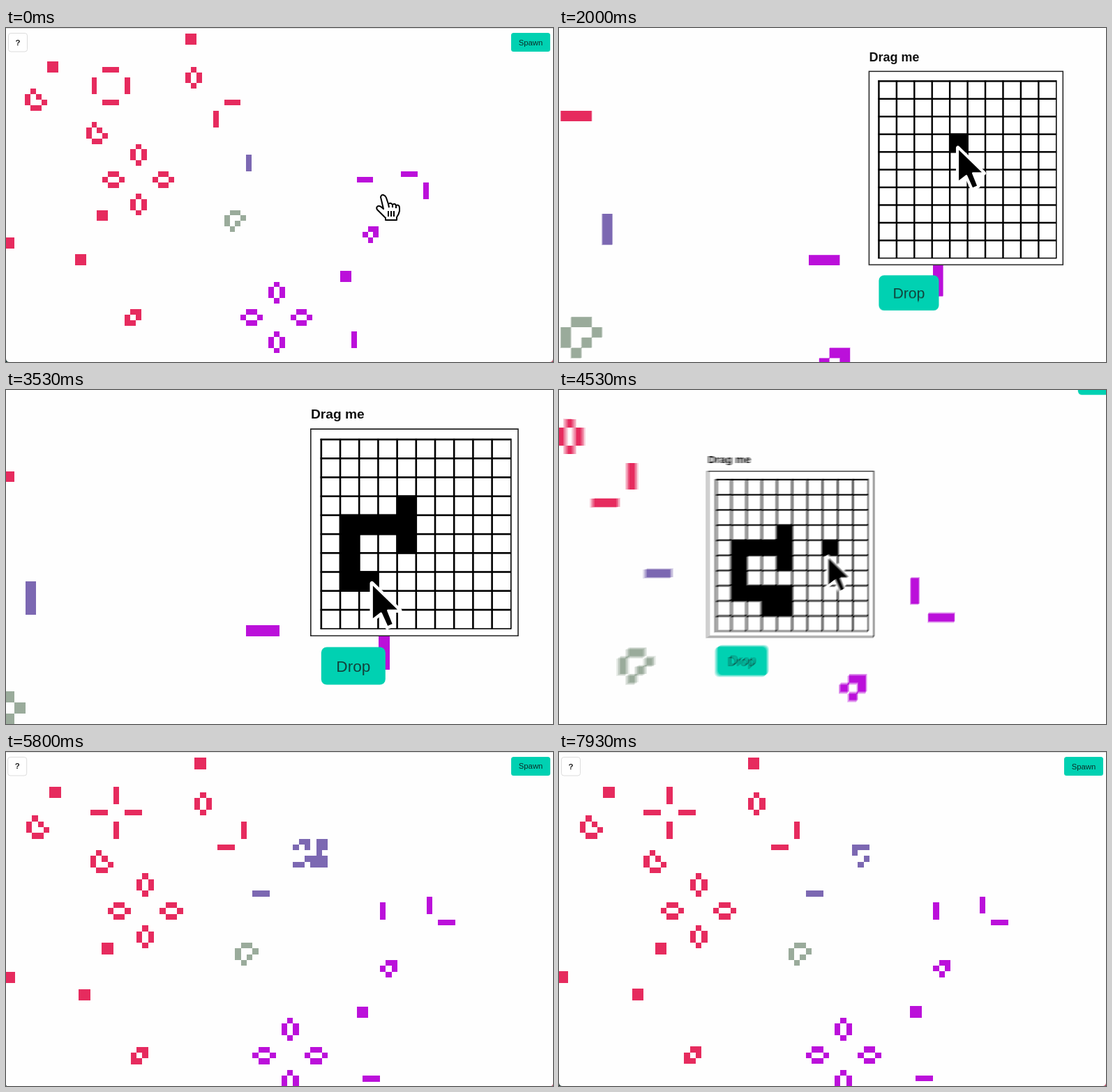
An HTML page with a canvas for the animation above (8 s loop, 784 px wide and 480 px high).

```html
<!DOCTYPE html>
<html lang="en">
<head>
<meta charset="utf-8">
<title>Life board</title>
<style>
  html, body { margin: 0; width: 100%; height: 100%; overflow: hidden; background: #fefefe; }
  canvas { display: block; }
</style>
</head>
<body>
<canvas id="stage" width="784" height="480"></canvas>
<script>
const W = 784, H = 480, LOOP = 8000;
const stage = document.getElementById('stage').getContext('2d');
const scene = document.createElement('canvas');
scene.width = W;
scene.height = H;
const ctx = scene.getContext('2d');
const RED = '#e62b5e', PURPLE = '#bb10da', BLUE = '#7c68b2', SAGE = '#9aab9b', TEAL = '#00d1b2';
const FONT = '"Liberation Sans", Arial, sans-serif';

// ---- Game of Life -------------------------------------------------------
const STEP = 342, PHASE = 0.4, FADING_GEN = 4, DROP_GEN = 15;
const DROP_TIME = (DROP_GEN - PHASE) * STEP;

const SHAPES = {
  block: ['XX', 'XX'],
  hiveV: ['.X', 'X.X', 'X.X', '.X'],
  hiveH: ['.XX', 'X..X', '.XX'],
  loaf: ['.X', 'X.X', 'X..X', '.XX'],
  loafUp: ['.XX', 'X..X', 'X.X', '.X'],
  ship: ['.XX', 'X.X', 'XX'],
  boat: ['.XX', 'X.X', '.X'],
  barH: ['XXX'],
  barV: ['X', 'X', 'X'],
  hats: ['.X', 'X.X', '', '', '', 'X.X', '.X']
};

function put(board, color, shape, ...places) {
  for (const [col, row] of places)
    SHAPES[shape].forEach((line, y) => [...line].forEach((ch, x) => {
      if (ch === 'X') board.set(`${col + x},${row + y}`, color);
    }));
}

function putFarm(board, color, col, row) {
  put(board, color, 'hiveV', [col, row], [col, row + 9]);
  put(board, color, 'hiveH', [col - 5, row + 5], [col + 4, row + 5]);
}

function nextBoard(board) {
  const near = new Map();
  for (const [key, color] of board) {
    const [col, row] = key.split(',').map(Number);
    for (let dy = -1; dy <= 1; dy++)
      for (let dx = -1; dx <= 1; dx++) {
        if (!dx && !dy) continue;
        const k = `${col + dx},${row + dy}`;
        near.set(k, { n: (near.get(k)?.n || 0) + 1, color });
      }
  }
  const next = new Map();
  for (const [k, { n, color }] of near)
    if (n === 3 || (n === 2 && board.has(k))) next.set(k, board.get(k) || color);
  return next;
}

// Cells painted in the panel: time, column, row.
const PAINT = [
  [1950, 4, 3], [2150, 4, 4], [2300, 4, 5], [2520, 3, 4], [2680, 2, 4],
  [2840, 1, 4], [3000, 1, 5], [3150, 1, 6], [3330, 1, 7], [3480, 2, 7],
  [3650, 3, 7], [3740, 4, 7], [3840, 4, 8], [3940, 3, 8], [4150, 7, 4]
];

function buildBoards() {
  let board = new Map();
  put(board, RED, 'block', [33, 1], [8, 6], [17, 33], [0, 38], [13, 41]);
  put(board, RED, 'hiveV', [33, 7]);
  put(board, RED, 'loaf', [4, 11], [15, 17]);
  put(board, RED, 'ship', [22, 51]);
  put(board, RED, 'barH', [18, 7], [18, 13], [40, 13]);
  put(board, RED, 'barV', [16, 9], [22, 9], [38, 15]);
  putFarm(board, RED, 23, 21);
  put(board, BLUE, 'barV', [44, 23]);
  put(board, SAGE, 'loafUp', [40, 33]);
  put(board, PURPLE, 'barH', [64, 27], [72, 26]);
  put(board, PURPLE, 'barV', [76, 28], [63, 55]);
  put(board, PURPLE, 'boat', [65, 36]);
  put(board, PURPLE, 'block', [61, 44]);
  putFarm(board, PURPLE, 48, 46);

  const boards = [board];
  for (let gen = 1; gen < 25; gen++) {
    board = nextBoard(board);
    if (gen === FADING_GEN) put(board, BLUE, 'hats', [52, 11]);
    if (gen === DROP_GEN)
      for (const [, col, row] of PAINT) board.set(`${50 + col},${12 + row}`, BLUE);
    boards.push(board);
  }
  return boards;
}
const boards = buildBoards();

// ---- Motion -------------------------------------------------------------
const PANEL_OPEN = 1580;
const HOME = [548.6, 72.6];
const cellCentre = ([t, col, row]) => [t, HOME[0] + 14 + col * 13.6, HOME[1] + 16 + row * 13.6];

const cursorKeys = [
  [1130, 540, 240], [1330, 697, 147], [1480, 752, 24], [1600, 752, 24],
  ...PAINT.slice(0, -1).map(cellCentre),
  [4140, 657, 150], [4480, 500, 179], [4560, 500, 179],
  [4850, 424, 276], [5020, 424, 276], [5450, 520, 340]
];
const panelKeys = [[4140, ...HOME], [4480, 392.3, 102.3]];
const focusKeys = [[2000, 669, 85], [3530, 661, 89.7], [4530, 691, 79]];

function track(keys, t) {
  const i = keys.findIndex(k => k[0] > t);
  if (i === 0) return keys[0].slice(1);
  if (i < 0) return keys[keys.length - 1].slice(1);
  const [a, b] = [keys[i - 1], keys[i]];
  const p = (t - a[0]) / (b[0] - a[0]), e = p * p * (3 - 2 * p);
  return [a[1] + (b[1] - a[1]) * e, a[2] + (b[2] - a[2]) * e];
}

// Critically damped spring from 0 to 1.
function spring(ms) {
  const s = Math.max(0, ms) * 0.006;
  return 1 - (1 + s) * Math.exp(-s);
}

function cameraAt(t) {
  const extra = spring(t - 1408) - spring(t - 4302);
  const [fx, fy] = track(focusKeys, t);
  return { z: 1 + extra, x: -fx * extra, y: -fy * extra };
}

// ---- Drawing ------------------------------------------------------------
function drawBoard(t, cam) {
  const [size, x0, y0] = t < DROP_TIME ? [7.92, -4.2, 0.2] : [8.3, -3.2, 0];
  const sx = col => Math.round((x0 + col * size) * cam.z + cam.x);
  const sy = row => Math.round((y0 + row * size) * cam.z + cam.y);
  for (const [key, color] of boards[Math.floor(t / STEP + PHASE)]) {
    const [col, row] = key.split(',').map(Number);
    ctx.fillStyle = color;
    ctx.fillRect(sx(col), sy(row), sx(col + 1) - sx(col), sy(row + 1) - sy(row));
  }
}

function box(x, y, w, h, r, fill, stroke) {
  ctx.beginPath();
  ctx.roundRect(x, y, w, h, r);
  ctx.fillStyle = fill;
  ctx.fill();
  if (stroke) {
    ctx.strokeStyle = stroke;
    ctx.lineWidth = 0.8;
    ctx.stroke();
  }
}

function text(str, x, y, size, color, weight = 'normal', align = 'center') {
  ctx.font = `${weight} ${size}px ${FONT}`;
  ctx.textAlign = align;
  ctx.fillStyle = color;
  ctx.fillText(str, x, y);
}

function drawFrame() {
  ctx.fillStyle = '#d6d6d6';
  ctx.fillRect(0, 0, W, 0.8);
  const corner = (x, inner, color) => {
    ctx.beginPath();
    ctx.moveTo(x, H);
    ctx.lineTo(inner, H);
    ctx.quadraticCurveTo(x, H, x, H - 5);
    ctx.fillStyle = color;
    ctx.fill();
  };
  corner(0, 5, '#17332d');
  corner(W, W - 5, '#b5506a');
}

function drawButtons() {
  box(3.5, 7.5, 27, 26.5, 3.5, '#fff', '#d4d4d4');
  text('?', 17, 24.5, 11.5, '#222', 'bold');
  box(724, 7, 56, 27, 3.5, TEAL);
  text('Spawn', 752, 24.5, 11.3, '#0b2f2a');
}

function drawPanel(t) {
  const cell = 13.6;
  ctx.save();
  ctx.translate(...track(panelKeys, t));
  text('Drag me', 0.4, -7.2, 9.6, '#111', 'bold', 'left');
  box(0.3, 0.3, 148.6, 148.6, 0, '#fff', '#222');
  ctx.translate(7.8, 7.8);
  ctx.fillStyle = '#000';
  for (let i = 0; i <= 10; i++) {
    const line = i === 10 ? 0.8 : 1.3;
    ctx.fillRect(i * cell - line / 2, -0.6, line, 136.8);
    ctx.fillRect(-0.6, i * cell - line / 2, 136.8, line);
  }
  for (const [when, col, row] of PAINT)
    if (t >= when) ctx.fillRect(col * cell - 0.6, row * cell - 0.6, cell + 1.2, cell + 1.2);
  box(0, 149.2, 46, 27, 4, TEAL);
  text('Drop', 23, 166.8, 11.3, '#12433c');
  ctx.restore();
}

const arrow = new Path2D('M0 0V26.5L6.5 21.5L11 31.5L15.5 29.5L11.5 19.5H20Z');
const hand = new Path2D('M-3 3Q-2-1 1 0Q4 1 5 4L8 13Q11 10 14 14Q17 11 19 15Q24 13 24 19' +
  'V23Q23 28 20 32V36H4V33L-2 27L-8 21Q-10 18-7 16Q-4 15 1 20Z');
const knuckles = new Path2D('M8 13L9 18M14 14V18M19 15V19M8 23V31M12 23V31M16 23V31');

function drawCursor(t) {
  if (t > 5450) return;
  ctx.save();
  ctx.translate(...track(cursorKeys, t));
  ctx.lineJoin = 'round';
  if (t < PANEL_OPEN) {
    if (t > 1150 && t < 1480) {
      ctx.globalAlpha = 0.5;
      ctx.filter = 'blur(1px)';
      ctx.rotate(0.2);
    }
    ctx.fillStyle = '#fff';
    ctx.strokeStyle = '#000';
    ctx.lineWidth = 2;
    ctx.fill(hand);
    ctx.stroke(hand);
    ctx.stroke(knuckles);
  } else {
    ctx.globalAlpha = Math.min(1, (5450 - t) / 350);
    ctx.fillStyle = '#000';
    ctx.strokeStyle = '#fff';
    ctx.lineWidth = 3;
    ctx.stroke(arrow);
    ctx.lineWidth = 1.4;
    ctx.fill(arrow);
    ctx.stroke(arrow);
  }
  ctx.restore();
}

function drawScene(t, cam) {
  ctx.setTransform(1, 0, 0, 1, 0, 0);
  ctx.fillStyle = '#fefefe';
  ctx.fillRect(0, 0, W, H);
  drawBoard(t, cam);
  ctx.setTransform(cam.z, 0, 0, cam.z, cam.x, cam.y);
  drawFrame();
  drawButtons();
  if (t >= PANEL_OPEN && t < DROP_TIME) drawPanel(t);
  drawCursor(t);
}

// Camera motion blur: average a few views across the open shutter.
const SHUTTER = 10, VIEWS = 5;
function render(t) {
  const speed = Math.abs(cameraAt(t + 1).z - cameraAt(t).z);
  const views = speed > 1e-4 ? VIEWS : 1;
  for (let i = 0; i < views; i++) {
    drawScene(t, cameraAt(t + SHUTTER * ((i + 0.5) / views - 0.5)));
    stage.globalAlpha = 1 / (i + 1);
    stage.drawImage(scene, 0, 0);
  }
}

const start = performance.now();
function tick() {
  render((performance.now() - start) % LOOP);
  requestAnimationFrame(tick);
}
tick();
</script>
</body>
</html>
```
